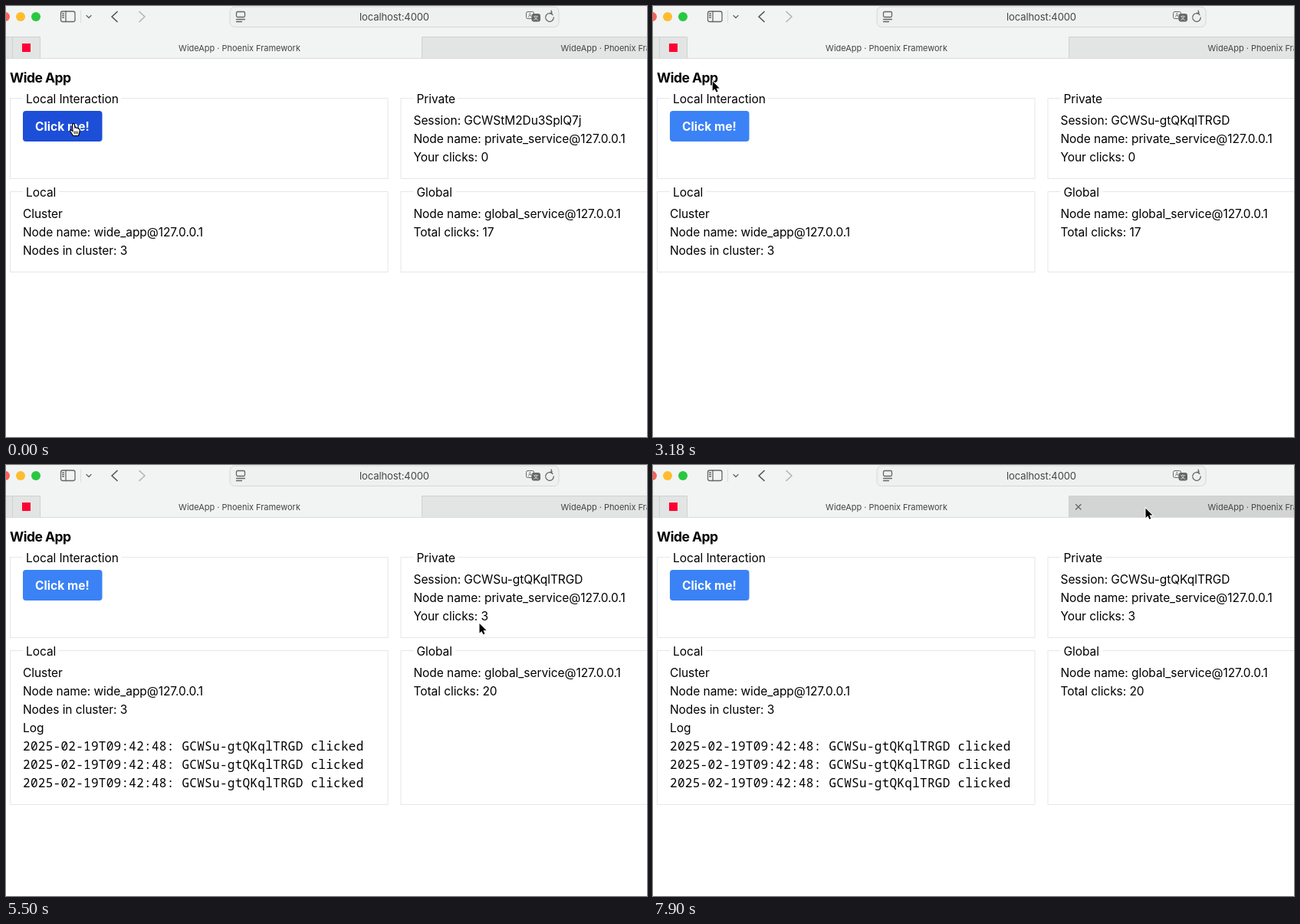
Animation, 836 px wide and 563 px high, one loop 7.99 s. Source, as an HTML page:

```html
<!DOCTYPE html>
<html lang="en">
<head>
<meta charset="utf-8">
<title>Click counter</title>
<style>
html, body { margin: 0; width: 100%; height: 100%; overflow: hidden; background: #fff; }
svg { display: block; width: 836px; height: 563px; }
text { font: 15.5px Inter, sans-serif; letter-spacing: -.06px; white-space: pre; }
.head { font-size: 17.5px; font-weight: 700; letter-spacing: -.5px; }
.btn { font-weight: 700; letter-spacing: .05px; fill: #fff; }
.mono { font: 16px "Noto Sans Mono", monospace; letter-spacing: .28px; }
.tab { font-size: 11px; letter-spacing: -.03px; fill: #444; }
.url { font-size: 13px; letter-spacing: -.1px; fill: #444; }
.box { fill: none; stroke: #e5e7eb; }
.icon { fill: none; stroke: #666; stroke-width: 1.3; stroke-linecap: round; stroke-linejoin: round; }
.tiny { font-size: 7px; letter-spacing: 0; fill: #666; }
</style>
</head>
<body>
<svg viewBox="0 0 836 563">
  <defs>
    <clipPath id="field"><rect x="291.500" y=".5" width="430" height="27.500" rx="7"/></clipPath>
    <path id="beamShape" fill="none" d="M-3-7.500Q0-7.500 0-5.500 0-7.500 3-7.500M0-5.500V5.500M-3 7.500Q0 7.500 0 5.500 0 7.500 3 7.500M-2 2.500H2"/>
  </defs>

  <!-- browser toolbar -->
  <rect width="836" height="68" fill="#f2f4f3"/>
  <circle cx="-1" cy="14" r="6" fill="#ff5f57"/>
  <circle cx="19" cy="14" r="6" fill="#febc2e"/>
  <circle cx="39" cy="14" r="6" fill="#28c840"/>
  <g class="icon">
    <rect x="71.500" y="7" width="18.500" height="13.500" rx="2.500"/>
    <path d="M78 7v13.500M73.500 10h2M73.500 12.500h2M73.500 15h2"/>
    <path d="M97.500 6v16" stroke="#dcdedd" stroke-width="1"/>
    <path d="M105 12.500l3 3 3-3"/>
    <path d="M145 7.500l-7 6.500 7 6.500" stroke="#555" stroke-width="1.700"/>
    <path d="M174 7.500l7 6.500-7 6.500" stroke="#b4b6b5" stroke-width="1.700"/>
  </g>
  <rect x="292" y="1" width="429" height="26.500" rx="6.500" fill="#eff1f0" stroke="#d6d8d7"/>
  <g clip-path="url(#field)"><rect id="bar" x="292" y="26" height="2" fill="#7da5f0"/></g>
  <g class="icon">
    <rect x="300.500" y="7.500" width="11" height="7" rx="1.500"/>
    <path d="M300.500 17.500h11M300.500 20.500h7"/>
    <rect x="678.500" y="7.500" width="10" height="9" rx="2" stroke-width="1"/>
    <rect x="686" y="10.500" width="10.500" height="9.500" rx="2" fill="#666" stroke-width="1"/>
    <path id="reload" d="M713 11.500A5.300 5.300 0 1 0 714.300 15M709.500 9.200l2.500-.2-1-3"/>
    <path id="stop" d="M705 10l8 8M713 10l-8 8"/>
  </g>
  <text class="tiny" x="681" y="14.500">A</text>
  <text class="tiny" x="687.500" y="18" style="fill:#f2f4f3">文</text>
  <text class="url" x="506.500" y="19" text-anchor="middle">localhost:4000</text>

  <!-- tabs -->
  <rect y="40" width="44.500" height="28" fill="#e3e4e4"/>
  <rect id="tab2" x="542.500" y="40" width="294" height="28"/>
  <path d="M0 40.500H44.500V68M8.500 40V68M836 40.500H542.500V68" fill="none" stroke="#cfd0d0"/>
  <path d="M0 68.500H836" stroke="#dadbdb"/>
  <rect x="21" y="49" width="11" height="11" fill="#ff0033"/>
  <text class="tab" x="304.500" y="58.500" text-anchor="middle">WideApp · Phoenix Framework</text>
  <text class="tab" x="723.500" y="58.500">WideApp · Phoenix Framework</text>
  <path id="close" class="icon" d="M551.500 51.500l6.500 6.500M558 51.500l-6.500 6.500" stroke-width="1"/>

  <!-- page -->
  <text class="head" x="5" y="100">Wide App</text>
  <rect class="box" x="5.500" y="120.500" width="492.500" height="105"/>
  <rect class="box" x="515" y="120.500" width="400" height="105"/>
  <rect class="box low" x="5.500" y="242.500" width="492.500"/>
  <rect class="box low" x="515" y="242.500" width="400"/>
  <path d="M22 120.500h128M531.500 120.500h58M22 242.500h47M531.500 242.500h55" stroke="#fff" stroke-width="3"/>
  <text x="26" y="127">Local Interaction</text>
  <rect id="btn" x="22" y="137" width="103.500" height="40" rx="4"/>
  <text class="btn" x="38" y="163">Click me!</text>
  <text x="535.500" y="127">Private</text>
  <text id="session" x="531.500" y="155"></text>
  <text x="531.500" y="179">Node name: private_service@127.0.0.1</text>
  <text id="mine" x="531.500" y="203"></text>
  <text x="26" y="249">Local</text>
  <text x="22" y="277">Cluster</text>
  <text x="22" y="301">Node name: wide_app@127.0.0.1</text>
  <text x="22" y="325">Nodes in cluster: 3</text>
  <text id="log" x="22" y="349">Log</text>
  <text class="mono" x="22" y="373">2025-02-19T09:42:48: GCWSu-gtQKqlTRGD clicked</text>
  <text class="mono" x="22" y="397">2025-02-19T09:42:48: GCWSu-gtQKqlTRGD clicked</text>
  <text class="mono" x="22" y="421">2025-02-19T09:42:48: GCWSu-gtQKqlTRGD clicked</text>
  <text x="535.500" y="249">Global</text>
  <text x="531.500" y="277">Node name: global_service@127.0.0.1</text>
  <text id="total" x="531.500" y="301"></text>

  <!-- pointer -->
  <g id="pointer">
    <circle id="ring" cx="2" cy="-.5" r="10.200" fill="none" stroke="#000" stroke-width="1.200"/>
    <path id="arrow" d="M0 0V12.500L2.900 9.900 4.900 14.300 6.900 13.400 5 9.100H9Z" stroke="#fff" stroke-width="1.800" paint-order="stroke"/>
    <g id="hand" stroke="#000">
      <path d="M-2.500 1Q-1-.8 .3 1L1 5.500Q2.500 4.500 3.300 6 5 5.200 5.600 7 7.200 6.600 7.200 8.500L6.800 12 5.500 16H-1.500L-5 10.500Q-6 8.500-4.500 8.300L-2 10Z" fill="#fff" stroke-width="1.200"/>
      <path d="M.2 10v3.500M2.200 10v3.500M4.200 10v3.500" stroke-width=".9"/>
    </g>
    <g id="beam">
      <use href="#beamShape" stroke="#fff" stroke-width="2.600"/>
      <use href="#beamShape" stroke="#000" stroke-width="1.200"/>
    </g>
  </g>
</svg>
<script>
const LOOP = 7990, START = 1020, STEP = 89.3;
const $ = id => document.getElementById(id);
const show = (el, on) => el.style.display = on ? '' : 'none';
const within = (t, ...spans) => spans.some(([a, b]) => t >= a && t < b);

// time, x, y of the pointer's hot spot
const path = [
  [0, 89, 153.5], [930, 89, 153.5], [1370, 189.5, 462], [1650, 189.5, 462],
  [1725, 62.5, 314.5], [2820, 62.5, 314.5], [3170, 78, 94], [3340, 69, 152.5],
  [4700, 69, 152.5], [5210, 600, 205], [5380, 619, 216], [5470, 617.5, 207],
  [5580, 617.5, 207], [5650, 622, 205], [5840, 622, 205], [6020, 641, 204],
  [6360, 535, 149], [6470, 535, 149], [6730, 552, 139], [7000, 540, 190],
  [7255, 541.5, 247], [7270, 541.5, 247], [7880, 642.5, 56.5], [LOOP, 642.5, 56.5]
];
const clicks = [3530, 3890, 4250];

function pointerAt(t) {
  const i = Math.max(1, path.findIndex(p => p[0] >= t));
  const [a, b] = [path[i - 1], path[i]];
  const k = Math.max(0, (t - a[0]) / (b[0] - a[0]));
  return [a[1] + (b[1] - a[1]) * k, a[2] + (b[2] - a[2]) * k];
}

function draw(t) {
  // the pointer advances in discrete steps
  const [x, y] = pointerAt(START + STEP * Math.floor((t - START + 10) / STEP));
  const onButton = x > 22 && x < 125 && y > 137 && y < 177;
  const onTab = x > 542 && y > 40 && y < 68;
  const onText = within(t, [1740, 2100], [5670, 7360]);
  const n = clicks.filter(c => t >= c).length;

  $('pointer').setAttribute('transform', `translate(${x} ${y})`);
  show($('hand'), onButton);
  show($('beam'), onText && !onButton);
  show($('arrow'), !onButton && !onText);
  show($('ring'), within(t, [1380, 1560], [3440, 3530], [3800, 3890], [4160, 4250]));

  $('btn').setAttribute('fill', onButton ? '#1d4ed8' : '#3b82f6');
  $('tab2').setAttribute('fill', onTab ? '#d3d4d4' : '#e3e4e4');
  show($('close'), onTab);

  const loading = within(t, [2190, 2460]);
  show($('stop'), loading);
  show($('reload'), !loading);
  $('bar').setAttribute('width', 429 * Math.min(1, Math.max(0, (t - 2100) / 400)));
  $('bar').setAttribute('opacity', Math.max(0, Math.min(1, (2820 - t) / 180)));

  $('session').textContent = 'Session: ' + (t < 2460 ? 'GCWStM2Du3SplQ7j' : 'GCWSu-gtQKqlTRGD');
  $('mine').textContent = 'Your clicks: ' + n;
  $('total').textContent = 'Total clicks: ' + (17 + n);
  show($('log'), n);
  document.querySelectorAll('.mono').forEach((row, i) => show(row, i < n));
  document.querySelectorAll('.low').forEach(b => b.setAttribute('height', 105 + (n && 24 * (n + 1))));
}

const begin = performance.now();
function tick() {
  draw((performance.now() - begin) % LOOP);
  requestAnimationFrame(tick);
}
tick();
</script>
</body>
</html>
```
